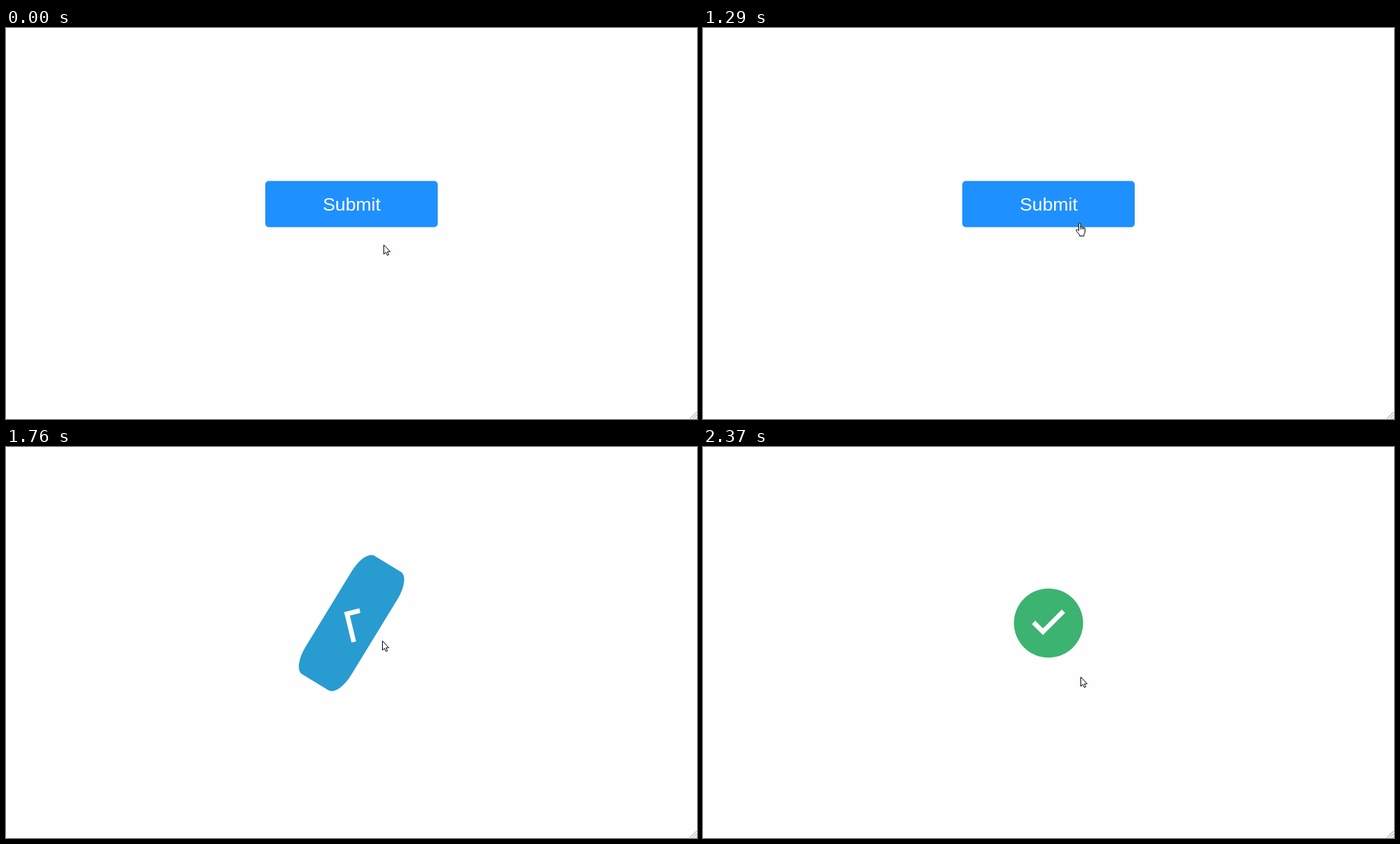
Write an HTML page that moves like this. It is 994 px wide and 563 px high and loops after 3.08 s.

```html
<!DOCTYPE html>
<html lang="en">
<head>
<meta charset="utf-8">
<title>Submit button</title>
<style>
  html, body { margin: 0; width: 100%; height: 100%; overflow: hidden; background: #fefefe; }
  svg { display: block; }
  text { font: 26.7px "Liberation Sans", Arial, sans-serif; fill: #fff; text-anchor: middle; }
  #tick { fill: none; stroke: #fff; stroke-width: 6.8; }
  #pointer { fill: #fff; stroke: #000; stroke-linejoin: round; }
</style>
</head>
<body>
<svg width="994" height="563" viewBox="0 0 994 563">
  <g id="button">
    <rect id="box"/>
    <path id="tick" d="M-21.5-1-8 12.5 21.5-17"/>
  </g>
  <text id="label" x="497.3" y="262.7">Submit</text>
  <path d="M984 562.5 993.5 553M988 562.5 993.5 557M992 562.5 993.5 561" stroke="#888" fill="none"/>
  <g id="pointer">
    <path id="arrow" d="M.5.2V13.6L3.5 10.8 5.5 15.3 7.6 14.4 5.7 10H9.6z"/>
    <path id="hand" transform="translate(-5 0)"
      d="M4.5 11V2Q4.5.8 5.8.8T7.1 2V7Q7.2 6 8.2 6T9.4 7.3Q9.6 6.5 10.5 6.6T11.6 8Q11.9 7.3 12.6 7.5T13.5 9V13Q13.5 15 12 17V19.5H5.8V17.8Q3 15 1 12 .5 10.5 1.6 10T4.5 12zM7.1 7V10M9.4 7.5V10M11.6 8V10"/>
  </g>
</svg>
<script>
const LOOP = 3080;
const $ = id => document.getElementById(id);
const mix = (a, b, p) => a + (b - a) * p;

// Cubic ease-in-out from 0 to 1 between two times
function ease(t, from, to) {
  const u = Math.min(1, Math.max(0, (t - from) / (to - from)));
  return u < .5 ? 4 * u ** 3 : 1 - 4 * (1 - u) ** 3;
}

function set(id, attrs) {
  for (const name in attrs) $(id).setAttribute(name, attrs[name]);
}

function show(id, on) {
  set(id, { visibility: on ? "visible" : "hidden" });
}

// Button turns half a revolution while it shrinks into a green disc
function drawButton(p) {
  const w = mix(248, 99.5, p), h = mix(66.4, 99.5, p);
  const rgb = [mix(30, 60, p), mix(144, 179, p), mix(255, 113, p)].map(Math.round);
  set("box", {
    x: -w / 2, y: -h / 2, width: w, height: h,
    rx: mix(5, w / 2, p), ry: mix(5, h / 2, p),
    fill: `rgb(${rgb})`
  });
  set("button", { transform: `translate(497 253.5) rotate(${180 * (1 - p)})` });
  show("label", p === 0);
  show("tick", p > 0);
}

function drawPointer(t, p) {
  const nudge = ease(t, 860, 870), rise = ease(t, 870, 1410), fall = ease(t, 1880, 2120);
  const x = Math.round(543 + nudge - 3 * rise + 2 * fall);
  const y = Math.round(312 - 33 * rise + 52 * fall);
  const overButton = y < 287 && (p === 0 || p > .7 && p < .97);
  set("pointer", { transform: `translate(${x} ${y})` });
  show("hand", overButton);
  show("arrow", !overButton);
}

const start = performance.now();
function frame() {
  const t = (performance.now() - start) % LOOP;
  const p = ease(t, 1592, 1982);
  drawButton(p);
  drawPointer(t, p);
  requestAnimationFrame(frame);
}
frame();
</script>
</body>
</html>
```
